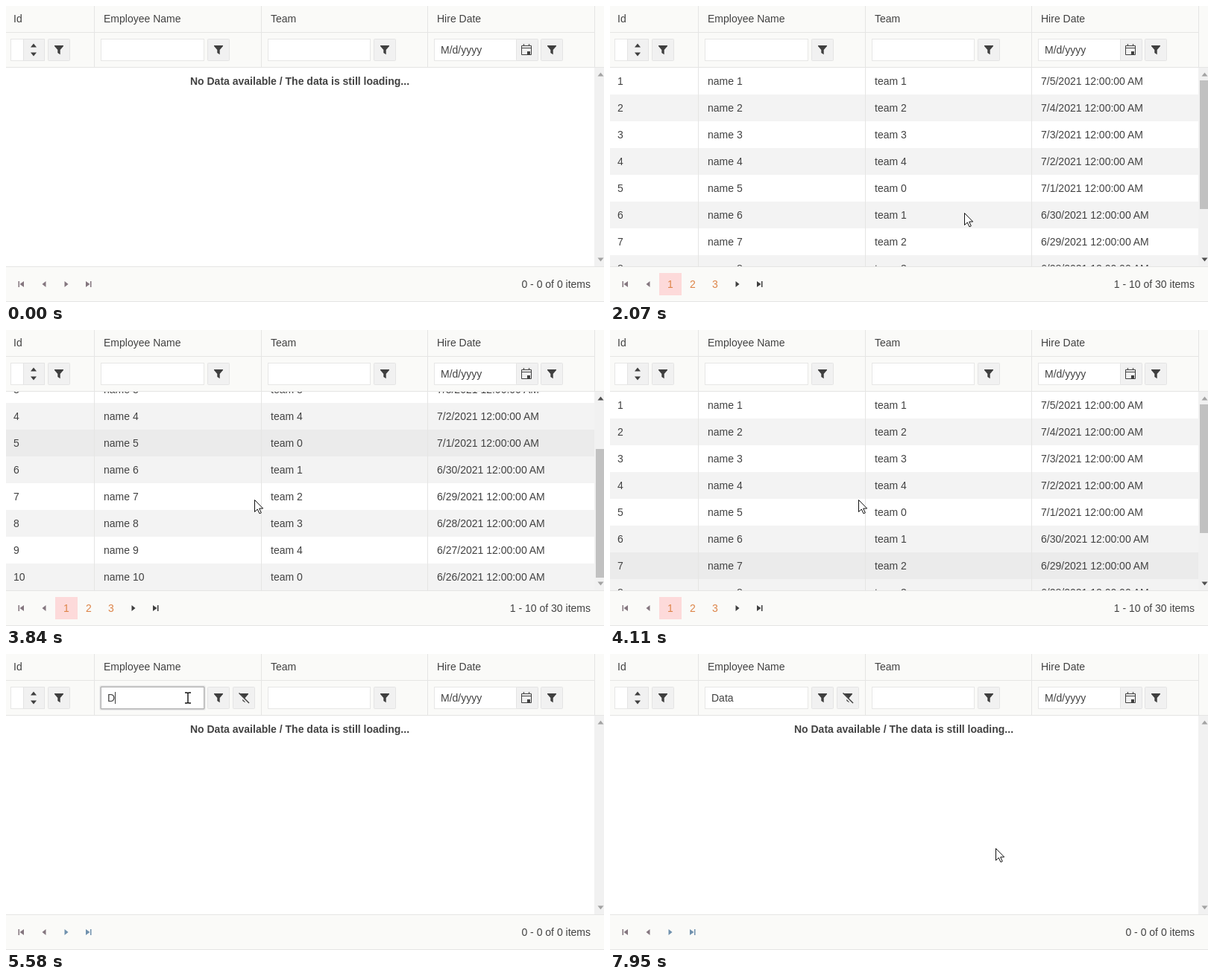
An HTML page that plays this animation: 802x398 px, repeating every 8000 ms.

```html
<!DOCTYPE html>
<html lang="en">
<head>
<meta charset="utf-8">
<title>Data grid</title>
<style>
html, body { margin: 0; width: 100%; height: 100%; overflow: hidden; background: #fff; }
svg { display: block; }
text { font: 14px "Liberation Sans", Arial, sans-serif; fill: #424242; white-space: pre; }
.bold { font-weight: bold; }
.mid { text-anchor: middle; }
.end { text-anchor: end; }
.page { fill: #dd8448; }
.line { fill: #e5e5e4; }
.bar { fill: #fafaf8; }
.field { fill: #fff; stroke: #e7e7e6; }
.button { fill: #f1f1f1; stroke: #e4e4e4; }
.icon { fill: #3f3f3f; }
.outline { fill: none; stroke: #3f3f3f; }
</style>
</head>
<body>
<svg id="stage" width="802" height="398" viewBox="0 0 802 398"></svg>
<script>
const LOOP = 8000, ROW = 36, TOP = 83, VIEW = 267, ROWS = 10;
const MAX_SCROLL = ROWS * ROW - VIEW;
const COLUMNS = [10, 131, 355, 578];
const LOADED = 2070, FOCUSED = 4720, BLURRED = 7340;
const KEYS = [5580, 5780, 5980, 6050];
const CARET_ON = [[FOCUSED, 5250], [KEYS[0], 6660], [7200, BLURRED]];

const easeOut = p => 1 - (1 - p) ** 2;
const easeInOut = p => p * p * (3 - 2 * p);
const linear = p => p;

// start, end, steps, from, to, easing
const MOVES = [
  [500, 910, 6, [489, 417], [413, 264], easeOut],
  [1370, 1930, 9, [413, 264], [475, 278], easeInOut],
  [2930, 3210, 5, [475, 278], [333, 228], easeInOut],
  [4180, 4320, 3, [333, 228], [312, 164], easeInOut],
  [4390, 4520, 3, [312, 164], [244, 64], linear],
  [FOCUSED, FOCUSED, 1, [244, 64], [244, 59], linear],
  [6860, 7200, 6, [244, 59], [492, 211], easeInOut],
  [7810, 7950, 3, [492, 211], [517, 261], linear]
];

const rect = (x, y, w, h, cls, more = '') =>
  `<rect x="${x}" y="${y}" width="${w}" height="${h}" class="${cls}" ${more}/>`;
const box = (x, y, w, h, cls, more) => rect(x + .5, y + .5, w - 1, h - 1, cls, more);
const text = (x, y, s, cls = '', more = '') =>
  `<text x="${x}" y="${y}" class="${cls}" ${more}>${s}</text>`;
const shape = (x, y, d, cls = 'icon', more = '') =>
  `<path transform="translate(${x} ${y})" d="${d}" class="${cls}" ${more}/>`;

const FUNNEL = 'M-6-6H6V-5L1.7 0V6.2L-1.7 4V0L-6-5z';
const UP = 'M-4 2.5 0-2.5 4 2.5z', DOWN = 'M-4-2.5 0 2.5 4-2.5z';
const PREV = 'M2.5-4V4L-2.5 0z', NEXT = 'M-2.5-4V4L2.5 0z';
const FIRST = 'M4-4V4L-1.5 0zM-3.5-4h1.5V4h-1.5z', LAST = 'M-4-4V4L1.5 0zM3.5-4H2V4h1.5z';

const button = (x, content) => box(x, 44, 30, 30, 'button', 'rx="1"') + content;
const filter = x => button(x, shape(x + 15, 59, FUNNEL));

function header() {
  const titles = ['Id', 'Employee Name', 'Team', 'Hire Date'];
  return rect(0, 0, 802, 82, 'bar') + rect(0, 35, 790, 1, 'line') + rect(0, 82, 802, 1, 'line') +
    [118, 342, 565, 789].map(x => rect(x, 0, 1, 82, 'line')).join('') +
    titles.map((s, i) => text(COLUMNS[i], 22, s)).join('') +
    box(6, 44, 46, 30, 'field') + box(23, 44, 29, 30, 'button') +
    shape(37, 53, UP) + shape(37, 65, DOWN) + filter(56) +
    box(125, 42, 143, 34, 'outline', 'id="glow" rx="2" style="stroke:#ececec"') +
    box(126, 43, 141, 32, 'outline', 'id="ring" rx="1.5" style="stroke:#cfcfcf"') +
    box(127, 44, 139, 30, 'field', 'id="nameBox"') + text(136, 64, '', '', 'id="typed"') +
    rect(136, 51, 1, 16, 'icon', 'id="caret"') + filter(270) +
    `<g id="clear">${button(304, shape(319, 59, FUNNEL) +
      shape(319, 59, 'M-7-5.5 6 7.5', 'outline', 'style="stroke:#f1f1f1;stroke-width:3"') +
      shape(319, 59, 'M-6.5-6.5 7 7', 'outline', 'stroke-width="1.4"'))}</g>` +
    box(351, 44, 138, 30, 'field') + filter(493) +
    box(574, 44, 139, 30, 'field') + text(583, 64, 'M/d/yyyy') + button(684, calendar()) + filter(717);
}

function calendar() {
  return shape(698, 59, 'M-6.5-5.5h13v12h-13zM-6.5-2.5h13M-3.5-8v3M3.5-8v3', 'outline') +
    rect(699, 61, 4, 4, 'icon');
}

function tableRow(i) {
  const date = new Date(2021, 6, 5 - i);
  const day = `${date.getMonth() + 1}/${date.getDate()}/2021 12:00:00 AM`;
  const cells = [i + 1, `name ${i + 1}`, `team ${(i + 1) % 5}`, day];
  return `<g transform="translate(0 ${i * ROW})">${rect(0, 0, 789, ROW, 'row')}` +
    cells.map((s, c) => text(COLUMNS[c], 23, s)).join('') + '</g>';
}

function body() {
  const rows = Array.from({ length: ROWS }, (_, i) => tableRow(i)).join('');
  return text(394, 106, 'No Data available / The data is still loading...', 'bold mid', 'id="message"') +
    `<g id="data" clip-path="url(#view)"><g id="rows">${rows}</g>` +
    [118, 342, 565].map(x => rect(x, TOP, 1, VIEW, 'line')).join('') + '</g>' +
    rect(789, TOP, 13, VIEW, '', 'fill="#f1f1f1"') +
    rect(791, 100, 11, 173, '', 'id="thumb" fill="#c1c1c1"') +
    shape(797.5, 92, UP, '', 'id="scrollUp"') + shape(797.5, 341, DOWN, '', 'id="scrollDown"');
}

function pager() {
  const pages = [1, 2, 3].map((n, i) => text(81 + i * 30, 379, n, 'mid page')).join('');
  return rect(0, 350, 802, 48, 'bar') + rect(0, 350, 802, 1, 'line') + rect(0, 397, 802, 1, 'line') +
    `<g fill="#84767f">${shape(20, 374, FIRST, '')}${shape(51, 374, PREV, '')}</g>` +
    `<g id="noPages">${shape(81, 374, NEXT, '')}${shape(111, 374, LAST, '')}</g>` +
    `<g id="pages">${rect(66, 359, 30, 30, '', 'fill="#fddada"')}${pages}` +
    shape(171, 374, NEXT) + shape(201, 374, LAST) + '</g>' +
    text(784, 379, '', 'end', 'id="count"');
}

const pointers =
  shape(0, 0, 'M.5.5V16.5L4.3 13 7 18.8 9.3 17.8 6.7 12H11.7z', '', 'id="arrow" fill="#fff" stroke="#111"') +
  shape(0, 0, 'M-4-7H-1L0-6 1-7H4M0-6V6M-4 7H-1L0 6 1 7H4', '', 'id="beam" fill="none" stroke="#111" stroke-width="1.4"');

const stage = document.getElementById('stage');
stage.innerHTML = `<defs><clipPath id="view">${rect(0, TOP, 802, VIEW, '')}</clipPath></defs>` +
  body() + header() + pager() + pointers;

const el = {};
stage.querySelectorAll('[id]').forEach(node => el[node.id] = node);
const rowFills = [...stage.querySelectorAll('.row')];
const show = (node, on) => node.setAttribute('display', on ? 'inline' : 'none');
const place = (node, x, y) => node.setAttribute('transform', `translate(${x} ${y})`);

// Progress that advances in equal hard steps, the first at `start`, the last at `end`.
function stepped(t, start, end, steps) {
  if (t < start) return 0;
  if (t >= end) return 1;
  const gap = (end - start) / (steps - 1);
  return (Math.floor((t - start) / gap + .001) + 1) / steps;
}

function pointerAt(t) {
  const move = MOVES.findLast(m => t >= m[0]);
  if (!move) return null;
  const [start, end, steps, from, to, ease] = move;
  const p = ease(stepped(t, start, end, steps));
  return from.map((v, i) => Math.round(v + (to[i] - v) * p));
}

function scrollAt(t) {
  const down = easeInOut(stepped(t, 3280, 3490, 4));
  const up = easeInOut(stepped(t, 3910, 4110, 4));
  return Math.round(MAX_SCROLL * (down - up));
}

function hoveredRow(t, pointer) {
  if (t < 2930 || t >= 4520) return -1;
  if (t >= 3210 && t < 3910) return 4;
  if (t >= 3910 && t < 4180) return 6;
  return Math.floor((pointer[1] - TOP) / ROW);
}

function render(t) {
  const loaded = t >= LOADED && t < KEYS[0];
  const pointer = pointerAt(t);
  const scroll = scrollAt(t);
  const hover = hoveredRow(t, pointer);
  const focused = t >= FOCUSED && t < BLURRED;

  show(el.message, !loaded);
  show(el.data, loaded);
  show(el.thumb, loaded);
  show(el.pages, loaded);
  show(el.noPages, !loaded);
  el.noPages.setAttribute('fill', t < LOADED ? '#84767f' : '#7091ae');
  el.count.textContent = loaded ? '1 - 10 of 30 items' : '0 - 0 of 0 items';
  place(el.rows, 0, TOP - scroll);
  el.thumb.setAttribute('y', 100 + 60 * scroll / MAX_SCROLL);
  el.scrollUp.setAttribute('fill', scroll > 0 ? '#505050' : '#a3a3a3');
  el.scrollDown.setAttribute('fill', loaded && scroll < MAX_SCROLL ? '#505050' : '#a3a3a3');
  rowFills.forEach((node, i) =>
    node.setAttribute('fill', i === hover ? '#ebebeb' : i % 2 ? '#f3f3f3' : '#fff'));

  const glow = focused ? stepped(t, FOCUSED, 4920, 3) : 0;
  el.glow.setAttribute('opacity', glow);
  el.ring.setAttribute('opacity', glow);
  el.nameBox.style.stroke = focused ? '#b4b4b4' : t >= 4520 && t < FOCUSED ? '#cfcfcf' : '';
  el.typed.textContent = 'Data'.slice(0, KEYS.filter(k => t >= k).length);
  show(el.clear, t >= KEYS[0]);
  show(el.caret, CARET_ON.some(([on, off]) => t >= on && t < off));
  el.caret.setAttribute('x', Math.floor(136 + el.typed.getComputedTextLength()));

  const overField = t >= 4520 && t < 7000 && pointer[0] < 266 && pointer[1] < 74;
  show(el.arrow, pointer && !overField);
  show(el.beam, overField);
  if (pointer) place(overField ? el.beam : el.arrow, ...pointer);
}

function tick() {
  render(performance.now() % LOOP);
  requestAnimationFrame(tick);
}
tick();
</script>
</body>
</html>
```
